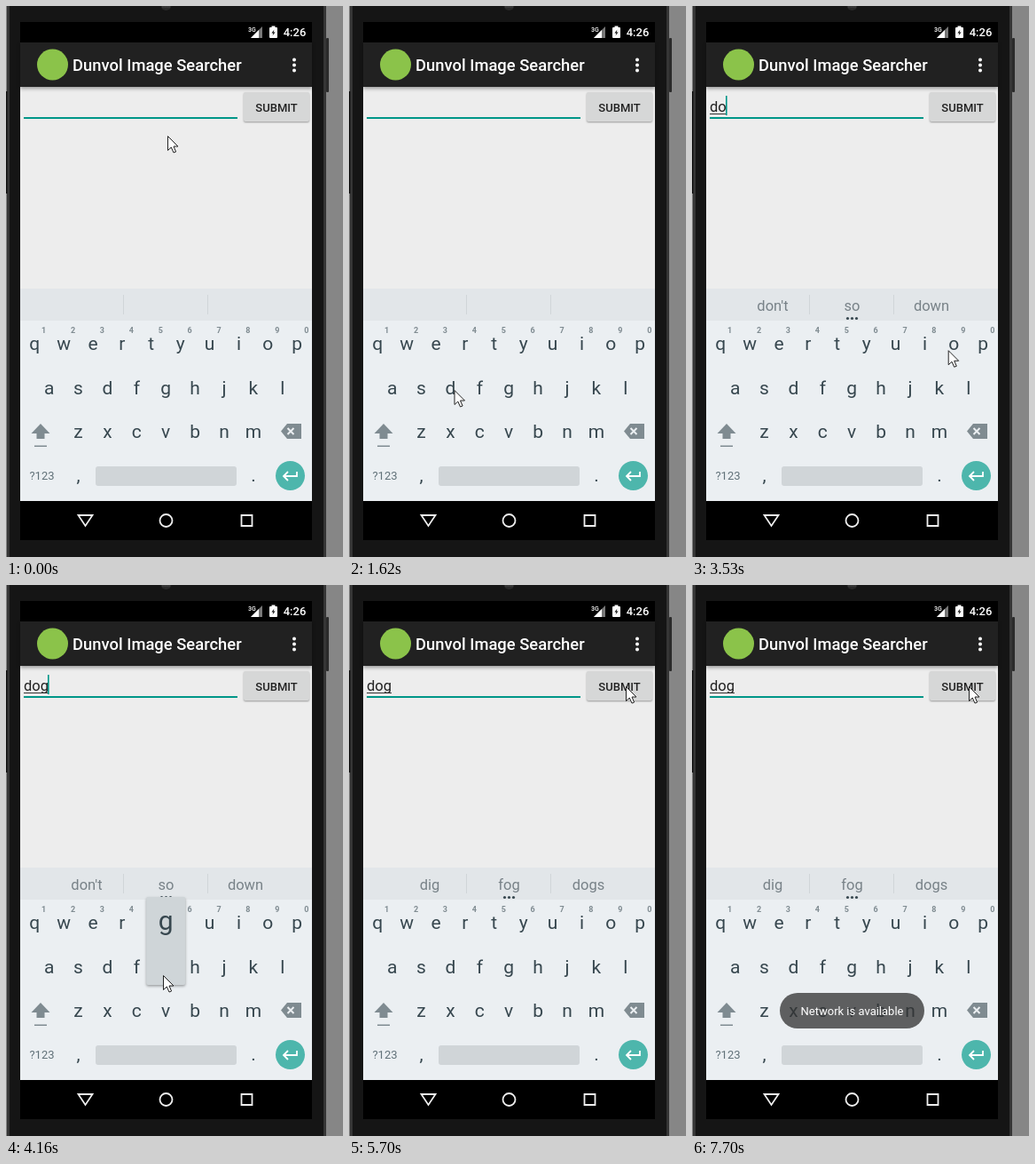
These frames come from a looping animation (380x620 px, 8 s). An HTML page with a canvas:

```html
<!DOCTYPE html>
<html lang="en">
<head>
<meta charset="utf-8">
<style>
  html, body { margin: 0; width: 100%; height: 100%; overflow: hidden; background: #151515; }
  canvas { display: block; }
</style>
</head>
<body>
<canvas id="stage" width="380" height="620"></canvas>
<script>
const ctx = document.getElementById('stage').getContext('2d');
const LOOP = 8000, POPUP_TIME = 150;
const INK = '#37474f', GREY = '#7f8b91', TEAL = '#009688';

const rows = ['qwertyuiop', 'asdfghjkl', 'zxcvbnm'];
const word = 'dog';
const pressTimes = [2190, 3260, 4160];
const hints = [[], ['did', 'day', 'due'], ["don't", 'so', 'down'], ['dig', 'fog', 'dogs']];

const pointerStart = { x: 182, y: 146 };
const moves = [
  { from: 130, to: 650, x: 187, y: 477 },
  { from: 700, to: 1060, x: 182, y: 432 },
  { from: 1180, to: 1600, x: 118.5, y: 432 },
  { from: 2200, to: 2900, x: 300, y: 382 },
  { from: 3400, to: 4100, x: 177, y: 439 },
  { from: 4500, to: 4850, x: 308, y: 129 },
  { from: 4900, to: 5700, x: 312, y: 114 },
];

const progress = (t, from, to) => Math.max(0, Math.min(1, (t - from) / (to - from)));
const smooth = k => k * k * (3 - 2 * k);
const pressesBy = t => pressTimes.filter(p => p <= t).length;

// Centre x and baseline of a key; rows are centred on the screen
function keyPosition(row, column) {
  return { x: 180.2 + (column - (rows[row].length - 1) / 2) * 32.9, y: 387 + row * 49.5 };
}

function rect(x, y, w, h, fill, r = 0) {
  ctx.fillStyle = fill;
  ctx.beginPath();
  ctx.roundRect(x, y, w, h, r);
  ctx.fill();
}

function disc(x, y, r, fill) {
  ctx.fillStyle = fill;
  ctx.beginPath();
  ctx.arc(x, y, r, 0, 7);
  ctx.fill();
}

function shape(d, x, y, fill, stroke, width = 1) {
  ctx.save();
  ctx.translate(x, y);
  const p = new Path2D(d);
  if (fill) { ctx.fillStyle = fill; ctx.fill(p); }
  if (stroke) { ctx.strokeStyle = stroke; ctx.lineWidth = width; ctx.stroke(p); }
  ctx.restore();
}

function text(s, x, y, size, color, align = 'center', weight = 400) {
  ctx.font = `${weight} ${size}px Roboto, sans-serif`;
  ctx.textAlign = align;
  ctx.fillStyle = color;
  ctx.fillText(s, x, y);
}

function shadowedRect(x, y, w, h, fill, r, blur) {
  ctx.save();
  ctx.shadowColor = 'rgba(0,0,0,.35)';
  ctx.shadowBlur = blur;
  ctx.shadowOffsetY = blur / 2;
  rect(x, y, w, h, fill, r);
  ctx.restore();
}

function drawPhone() {
  rect(0, 0, 380, 620, '#868686');
  rect(1, 0, 360, 620, '#363636');
  rect(4, 0, 354, 620, '#151515');
  rect(0, 96, 1.5, 115, '#111');
  rect(361, 36, 3, 61, '#2b2b2b', 1);
  disc(180.5, -1, 6, '#292929');
  for (let i = 0; i < 4; i++) disc(177 + i * 2.3, 1, .7, '#555');
  rect(16, 18, 329, 583, '#000');
}

function drawBars() {
  text('3G', 273, 29, 7, '#fff', 'left', 500);
  shape('M13 0V13H0Z', 276, 23, '#777');
  shape('M9 4V13H0Z', 276, 23, '#fff');
  rect(297, 24, 9, 12, '#fff', 1);
  rect(299.5, 22.5, 4, 2, '#fff');
  shape('M3 0L0 4H2L1 7L4 3H2Z', 299.5, 26.5, '#000');
  text('4:26', 325.5, 34, 13, '#fff', 'center', 500);

  rect(16, 91, 329, 228, '#ededed');
  shadowedRect(16, 41, 329, 50, '#212121', 0, 4);
  disc(52.5, 66, 17.5, '#8bc34a');
  text('Dunvol Image Searcher', 75, 73, 18.4, '#fff', 'left', 500);
  for (let i = -1; i < 2; i++) disc(325, 66.5 + i * 6, 2, '#fff');

  shape('M1 1H17L9 13Z', 80.5, 572, null, '#eee', 1.8);
  shape('M7 0A7 7 0 1 1 -7 0A7 7 0 1 1 7 0Z', 180.5, 579, null, '#eee', 1.8);
  shape('M0 0H12V12H0Z', 265.5, 573, null, '#eee', 1.8);
}

function drawForm(t) {
  const count = pressesBy(t);
  const typed = word.slice(0, count);
  rect(20, 125, 241, 2, TEAL);
  text(typed, 20, 119, 16.5, '#212121', 'left');
  const width = ctx.measureText(typed).width;
  rect(20, 121, width, 1, '#333');

  // Each key press restarts the blink
  const blinkStart = count ? pressTimes[count - 1] : 100;
  if (t >= blinkStart && (t - blinkStart) % 1000 < 500) rect(Math.round(19.3 + width), 101, 1.6, 22, TEAL);

  const pressed = t >= 6100 && t < 6400;
  shadowedRect(268, 97, 74, 33, pressed ? '#c2c3c3' : '#d6d7d7', 2, 2);
  text('SUBMIT', 305, 118.5, 13, '#212121', 'center', 500);
}

function drawHints(t) {
  rect(16, 318, 329, 36, '#e2e6e9');
  rect(132, 325, 1, 22, '#d0d5d8');
  rect(227, 325, 1, 22, '#d0d5d8');
  hints[pressesBy(t - POPUP_TIME)].forEach((hint, i) => {
    text(hint, 91 + i * 89.5, 343, 16.5, '#788288');
    disc(175.5 + i * 5, 351.5, 1.6, INK);
  });
}

function drawKeyboard() {
  rect(16, 354, 329, 203, '#ebeff2');
  rows.forEach((row, r) => [...row].forEach((key, i) => {
    const { x, y } = keyPosition(r, i);
    text(key, x, y, 21, INK);
    if (r === 0) text((i + 1) % 10, x + 10.5, 368, 9, GREY, 'center', 700);
  }));

  shape('M10.5 0L21 11H15V17H6V11H0Z', 28.5, 470, GREY);
  rect(32, 494.5, 14, 1.5, GREY);
  shape('M7 0H23V17H7L0 8.5Z', 310, 470, GREY);
  shape('M0 0L7 7M7 0L0 7', 317.5, 475, null, '#ebeff2', 2);
  text('?123', 40.5, 533, 13, '#607078');
  text(',', 81.5, 535, 21, INK);
  text('.', 279, 535, 21, INK);
  rect(101, 518, 159, 22, '#d0d5d8', 3);
  disc(320.5, 528.5, 16.5, '#4db6ac');
  shape('M16 0V5H1M6 0L1 5L6 10', 312, 524, null, '#fff', 1.8);
}

function drawPopup(t) {
  const i = pressTimes.findIndex(p => t >= p && t < p + POPUP_TIME);
  if (i < 0) return;
  const row = rows.findIndex(r => r.includes(word[i]));
  const { x, y } = keyPosition(row, rows[row].indexOf(word[i]));
  shadowedRect(x - 22, y - 85.5, 44, 99, '#cfd5d8', 2, 3);
  text(word[i], x, y - 49, 30, INK);
}

function drawToast(t) {
  ctx.save();
  ctx.globalAlpha = progress(t, 6420, 6890);
  rect(99, 459, 163, 40, 'rgba(50,50,50,.76)', 20);
  text('Network is available', 180.5, 484, 13, '#fff');
  ctx.restore();
}

function drawPointer(t) {
  let { x, y } = pointerStart;
  for (const move of moves) {
    const k = smooth(progress(t, move.from, move.to));
    x += (move.x - x) * k;
    y += (move.y - y) * k;
  }
  shape('M.5 .5V16.5L4.3 13L7 19L9.6 18L7 12H12Z', x, y, '#fff', '#222');
}

function frame(now) {
  const t = now % LOOP;
  drawPhone();
  drawBars();
  drawForm(t);
  drawHints(t);
  drawKeyboard();
  drawPopup(t);
  drawToast(t);
  drawPointer(t);
  requestAnimationFrame(frame);
}
requestAnimationFrame(frame);
</script>
</body>
</html>
```
